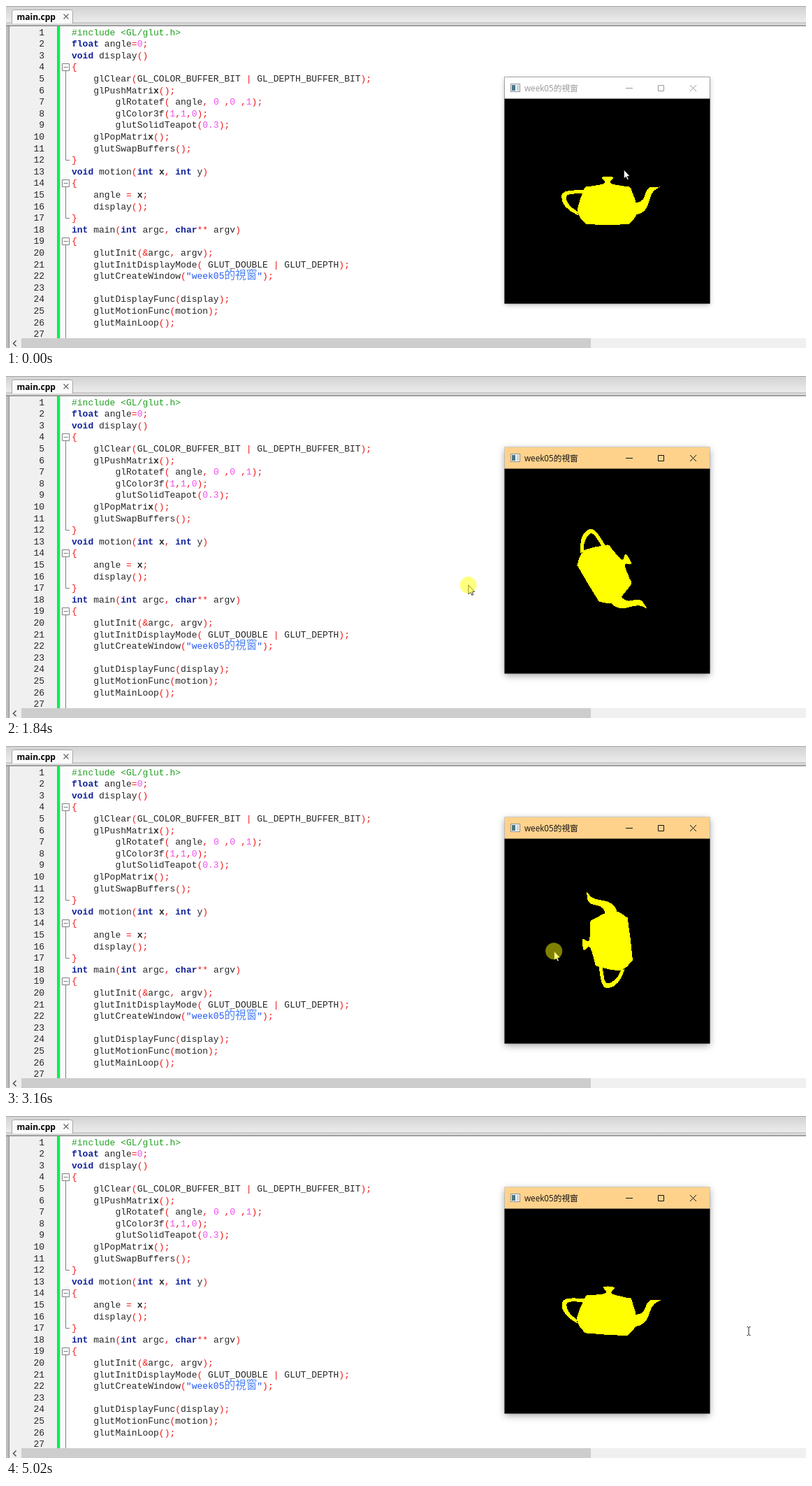
Write an HTML page that moves like this. It is 1145 px wide and 489 px high and loops after 5.09 s.

```html
<!DOCTYPE html>
<html lang="zh-Hant">
<head>
<meta charset="utf-8">
<title>Rotating teapot</title>
<style>
  html, body { margin: 0; width: 100%; height: 100%; overflow: hidden; background: #fff; }
  #stage { position: absolute; left: 0; top: 0; width: 1145px; height: 489px; overflow: hidden; background: #fff; }
  #stage svg { position: absolute; left: 0; top: 0; overflow: visible; }
  .line, .num { position: absolute; font: 13px/16.6px "Liberation Mono", "Courier New", monospace; white-space: pre; color: #262626; }
  .line { left: 94px; }
  .num { left: 10px; width: 45px; text-align: right; }
  .pre { color: #20a020; }
  .str { color: #2456f0; }
  .cjk { color: #4a80f5; font: 300 15.6px/0 "Noto Sans CJK TC", "Noto Sans CJK", "Noto Sans CJK SC", sans-serif; }
  .key { color: #10209a; font-weight: bold; }
  .val { color: #f050f0; }
  .op { color: #f01818; }
  .x { font-weight: bold; }
  #win { position: absolute; left: 714px; top: 102px; width: 293px; height: 323px; box-shadow: 0 0 0 1px rgba(110,110,110,.55), 0 2px 7px rgba(0,0,0,.3); }
  #bar { height: 31px; background: #fff; color: #999; }
  #bar span { position: absolute; left: 28px; top: 0; font: 11.7px/31px "Open Sans", "Noto Sans CJK TC", "Noto Sans CJK", sans-serif; white-space: nowrap; }
  #win.on { box-shadow: 0 0 0 1px rgba(150,130,90,.3), 0 3px 10px rgba(0,0,0,.38); }
  #win.on #bar { background: #ffd28c; color: #111; }
</style>
</head>
<body>
<div id="stage">
  <svg width="1145" height="489">
    <defs>
      <linearGradient id="strip" x2="0" y2="1">
        <stop offset="0" stop-color="#d2d2d2"/><stop offset="1" stop-color="#f2f2f2"/>
      </linearGradient>
    </defs>
    <rect width="1145" height="29" fill="url(#strip)"/>
    <rect width="1145" height="1" fill="#a8a8a8"/>
    <rect y="24" width="1145" height="4" fill="#dcdcdc"/>
    <rect y="23.5" width="1145" height="1" fill="#b4b4b4"/>
    <rect y="27.5" width="1145" height="1.5" fill="#8a8a8a"/>
    <path d="M8.5 25V8.5Q8.5 5.5 11.5 5.5H92.5Q95.5 5.5 95.5 8.5V25" fill="#fafafa" stroke="#a6a6a6"/>
    <text x="15.5" y="19.5" font-family="Open Sans, sans-serif" font-weight="700" font-size="12">main.cpp</text>
    <path d="M82.5 11.5l7 7m0-7l-7 7" stroke="#666" stroke-width="1.2"/>
    <rect y="29" width="4" height="460" fill="#bcbcbc"/>
    <rect x="4" y="29" width="1" height="460" fill="#8a8a8a"/>
    <rect x="5" y="29" width="68" height="446" fill="#f0f0f0"/>
    <rect x="73" y="29" width="4.5" height="446" fill="#00f050"/>
    <rect x="77.5" y="29" width="14" height="446" fill="#fbfbfb"/>
    <g fill="none" stroke="#808080">
      <path d="M85.5 93V220.5H91M85.5 259V303.5H91M85.5 342V475"/>
      <path id="fold" d="M80.500 82.500h10v10h-10zM82.500 87.500h6" fill="#fff"/>
      <use href="#fold" y="166"/><use href="#fold" y="249"/>
    </g>
    <rect x="5" y="475" width="1140" height="14" fill="#f0f0f0"/>
    <rect x="22" y="475" width="815" height="14" fill="#cdcdcd"/>
    <path d="M14.5 478.5l-4 4 4 4" fill="none" stroke="#505050" stroke-width="1.5"/>
  </svg>
  <div id="code"></div>
  <div id="win">
    <div id="bar">
      <svg width="293" height="323" fill="none" stroke="currentColor">
        <rect x="-.5" y="30.5" width="294" height="293" fill="#000" stroke="none"/>
        <rect x="8.5" y="9.5" width="13" height="11" fill="#f4f6f8" stroke="#8c949c"/>
        <rect x="10" y="11" width="5" height="8" fill="#4a7684" stroke="none"/>
        <rect x="17" y="11" width="3" height="8" fill="#c9d2d8" stroke="none"/>
        <path d="M173 15.5h10M219.5 11.5h8v8h-8zM265 11l9 9m0-9l-9 9"/>
      </svg>
      <span>week05的視窗</span>
    </div>
  </div>
  <svg width="1145" height="489">
    <g id="pot" fill="#ff0" shape-rendering="crispEdges">
      <g transform="scale(21.975 -21.975) translate(0 -1.5)">
        <g id="half">
          <path d="M-.1 3.15H0C.8 3.15 0 2.85 .2 2.7C.4 2.55 1.3 2.55 1.3 2.4H-.1Z"/>
          <path d="M-.1 2.495H1.4L1.5 2.4L1.8 1.62L1.98 .95L1.96 .8L1.74 .4L1.48 .13L1.4 .02L0 0H-.1Z"/>
        </g>
        <use href="#half" transform="scale(-1 1)"/>
        <path d="M-1.6 2.025C-2.3 2.025 -2.7 2.025 -2.7 1.8C-2.7 1.575 -2.5 1.125 -2 .9L-1.9 .6C-2.65 .94 -3 1.35 -3 1.8C-3 2.25 -2.5 2.25 -1.5 2.25Z"/>
        <path d="M1.7 1.425C2.6 1.425 2.3 2.1 2.7 2.4L2.79 2.455L3.41 2.47L3.3 2.4C2.4 2.025 3.1 .825 1.7 .6Z"/>
      </g>
    </g>
    <g id="mouse">
      <path id="arrow" d="M.3 0V13L3.3 10.3L5.2 14.6L7.2 13.7L5.3 9.5H9Z" fill="#fff" stroke="#111" stroke-width=".9"/>
      <circle id="press" r="12" fill="#ff0" fill-opacity=".5"/>
      <path id="beam" d="M-.5 -5V6M-3 -5.500H-1.500L-.5 -4.500L.5 -5.500H2M-3 6.500H-1.500L-.5 5.500L.5 6.500H2" fill="none" stroke="#222"/>
    </g>
  </svg>
</div>
<script>
const LOOP = 5090;
const PRESS = 13, RELEASE = 71, BEAM = 72;   // steps
const LAG = 0.35;                            // the teapot trails the pointer
const $ = id => document.getElementById(id);

const source = `#include <GL/glut.h>
float angle=0;
void display()
{
    glClear(GL_COLOR_BUFFER_BIT | GL_DEPTH_BUFFER_BIT);
    glPushMatrix();
        glRotatef( angle, 0 ,0 ,1);
        glColor3f(1,1,0);
        glutSolidTeapot(0.3);
    glPopMatrix();
    glutSwapBuffers();
}
void motion(int x, int y)
{
    angle = x;
    display();
}
int main(int argc, char** argv)
{
    glutInit(&argc, argv);
    glutInitDisplayMode( GLUT_DOUBLE | GLUT_DEPTH);
    glutCreateWindow("week05的視窗");

    glutDisplayFunc(display);
    glutMotionFunc(motion);
    glutMainLoop();
`;
const kinds = ['pre', 'str', 'cjk', 'key', 'val', 'x', 'op'];
const token = /(#.*)|("\w*)|([\u4e00-\u9fff]+)|\b(float|void|int|char)\b|\b(\d[\d.]*)|(x\b)|([^\w\s"]+)|\s+|[^\Wx]+?(?=x\b|\W|$)|\w/g;

function add(parent, tag, cls, text = '') {
  const el = document.createElement(tag);
  el.className = cls;
  el.textContent = text;
  return parent.appendChild(el);
}

source.split('\n').forEach((text, i) => {
  const top = 30.6 + 16.6 * i + 'px';
  add($('code'), 'div', 'num', i + 1).style.top = top;
  const line = add($('code'), 'div', 'line');
  line.style.top = top;
  for (const m of text.matchAll(token)) {
    const kind = m.slice(1).findIndex(Boolean);
    add(line, 'span', kinds[kind] || '', m[0]);
  }
});

// turning points of the pointer: step, x, y
const turns = [
  [-1, 884, 234], [7.5, 864, 290], [14, 863, 290], [19.3, 805, 314],
  [24, 651, 299], [24.8, 651, 299], [36.6, 1070, 294], [39.1, 1070, 297],
  [49.4, 604, 291], [51.4, 604, 291], [61.4, 1038, 311], [65, 1062, 307]
];

function pointer(k) {
  const i = turns.findIndex(p => p[0] > k);
  if (i < 0) return turns.at(-1).slice(1);
  const [k0, x0, y0] = turns[i - 1], [k1, x1, y1] = turns[i];
  const f = (1 - Math.cos(Math.PI * (k - k0) / (k1 - k0))) / 2;
  return [x0 + (x1 - x0) * f, y0 + (y1 - y0) * f];
}

// the screen was refreshed in steps of about 69 ms
function stepAt(t) {
  if (t < 60) return -1;
  return Math.floor((t < 940 ? (t - 60) / 67.7 : PRESS + (t - 940) / 69.15) + 0.08);
}

// while dragging, the angle in degrees is the pointer's x in the 300 px wide window
const angle = k => k < PRESS ? 0 : (pointer(k - LAG)[0] - 714) * 300 / 293;

const show = (id, on) => $(id).setAttribute('visibility', on ? 'visible' : 'hidden');

function draw(t) {
  const k = stepAt(t);
  const [x, y] = pointer(k);
  const beam = k >= BEAM;
  $('pot').setAttribute('transform', `translate(861 279.8) rotate(${-angle(k)})`);
  $('mouse').setAttribute('transform', `translate(${x + (beam ? 1.5 : 0)} ${y})`);
  $('win').className = k >= PRESS ? 'on' : '';
  show('press', k >= PRESS && k < RELEASE);
  show('arrow', !beam);
  show('beam', beam);
}

const start = performance.now();
function tick() {
  draw((performance.now() - start) % LOOP);
  requestAnimationFrame(tick);
}
tick();
</script>
</body>
</html>
```
